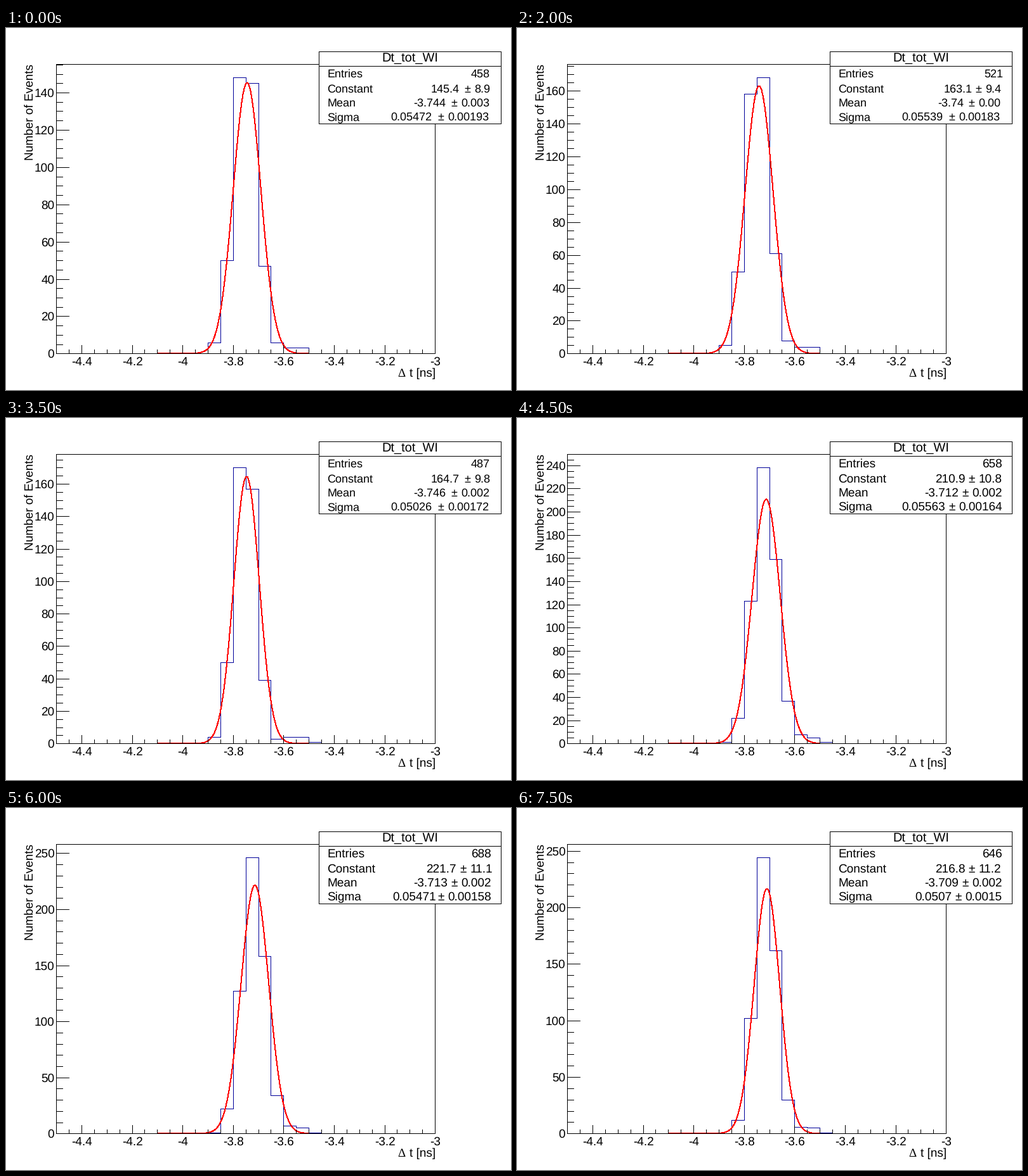
A matplotlib script for the animation above (8000 ms loop, 796x572 px).

```python
import math
import numpy as np
import matplotlib.pyplot as plt
from matplotlib.animation import FuncAnimation
from matplotlib.patches import Rectangle

W, H, DPI = 796, 572, 64
PT = 72 / DPI
FRAMES, INTERVAL = 16, 500
LEFT, RIGHT, TOP, BOTTOM = 79, 676, 57, 514
X_MIN, BIN, N_BINS = -4.5, 0.05, 30
FIT_RANGE = (-4.1, -3.5)
BLUE, RED = "#000099", "#ff0000"

plt.rcParams.update({"font.family": "Liberation Sans", "text.hinting": "none"})

# run: entries, tallest bin, fit constant, mean, sigma
KEYS = {
    0: (458, 148, 145.4, -3.744, .05472),
    2: (518, 185, 175.8, -3.742, .05185),
    4: (521, 168, 163.1, -3.740, .05539),
    7: (487, 170, 164.7, -3.746, .05026),
    9: (658, 238, 210.9, -3.712, .05563),
    12: (688, 246, 221.7, -3.713, .05471),
    15: (646, 244, 216.8, -3.709, .05070),
}

fig = plt.figure(figsize=(W / DPI, H / DPI), dpi=DPI, facecolor="white")
ax = fig.add_axes([0, 0, 1, 1])


def run_data(i):
    return [np.interp(i, list(KEYS), column) for column in zip(*KEYS.values())]


def bin_counts(peak, mean, sigma):
    """A core slightly sharper than the fit, with a small tail on the right."""
    x = X_MIN + BIN * (np.arange(N_BINS) + .5)
    core = np.exp(-.66 * ((x - mean + .007) / sigma) ** 2)
    tail = .025 * np.exp(-((x + 3.55) / .05) ** 2)
    shape = core + tail
    return np.round(peak * shape / shape.max())


def px(x):
    return 79.6 + 398 * (x - X_MIN)


def py(v, top):
    return 514.8 - 457.6 * v / top


def line(xs, ys, color="black", width=1, **kw):
    ax.plot(xs, ys, color=color, lw=width * PT, antialiased=False,
            solid_capstyle="butt", solid_joinstyle="miter", **kw)


def text(x, y, s, size=19, ha="left", **kw):
    ax.text(x, y, s, fontsize=size * PT, ha=ha, va="baseline", **kw)


def box(x0, y0, x1, y1, **kw):
    ax.add_patch(Rectangle((x0, y0), x1 - x0, y1 - y0, ec="black", lw=PT,
                           antialiased=False, **kw))


def advance(s, size=19):
    """Ink width of a number; a closing 1 leaves blank space on its right."""
    em = sum({".": .278, "-": .333}.get(c, .556) for c in s)
    return (em - .18 * s.endswith("1")) * size


def draw_histogram(counts, top):
    edges = np.floor(px(X_MIN + BIN * np.arange(N_BINS + 1)) + 1e-6)
    levels = np.floor(py(counts, top))
    ys = np.concatenate([[BOTTOM], np.repeat(levels, 2), [BOTTOM]])
    line(np.repeat(edges, 2), ys, BLUE)


def draw_fit(const, mean, sigma, top):
    x = np.linspace(*FIT_RANGE, 100)
    y = const * np.exp(-.5 * ((x - mean) / sigma) ** 2)
    line(px(x) - .75, py(y, top) - .75, RED)


def draw_axes(top):
    box(LEFT, TOP, RIGHT, BOTTOM, fill=False, zorder=3)
    for k in range(1, N_BINS + 1):
        value = X_MIN + BIN * k
        x = math.floor(px(value) + 1e-6)
        major = k % 4 == 2
        line([x, x], [BOTTOM, BOTTOM - (13 if major else 6)])
        if major:
            text(x, 533, f"{round(value, 1):g}", ha="center")
    major, minor = (20, 5) if top < 250 else (50, 10)
    for v in range(0, int(top) + 1, minor):
        y = math.floor(py(v, top))
        line([LEFT, LEFT + (20 if v % major == 0 else 10)], [y, y])
        if v % major == 0:
            text(76, y + 7, str(v), ha="right")
    text(42.5, 56.5, "Number of Events", ha="right", rotation=90, rotation_mode="anchor")
    text(617.5, 551, "Δ", family="Liberation Serif")
    text(676.5, 551, "t [ns]", ha="right")


def draw_stats(entries, const, mean, sigma, size):
    box(493, 37, 780, 151, fc="white", zorder=4)
    line([493, 780], [60, 60], zorder=5)
    text(637, 53, "Dt_tot_WI", 20, "center", zorder=5)
    edge = 764.5
    root = math.sqrt(entries)
    rows = (
        ("Constant", 102, const, 1.31 * const / root),
        ("Mean", 124, mean, sigma / root),
        ("Sigma", 146, sigma, 1.068 * sigma / (math.sqrt(2) * root)),
    )
    count = f"{entries:.0f}"
    text(506, 78, "Entries", size, zorder=5)
    text(edge - advance(count), 78, count, size, zorder=5)
    for name, y, value, error in rows:
        value = f"{value:.4g}"
        error = f"{error:.{len(value.partition('.')[2])}f}"
        x_err = edge - advance(error)
        x_pm = x_err - 16
        text(506, y, name, size, zorder=5)
        text(x_err, y, error, size, zorder=5)
        text(x_pm, y, "±", size, zorder=5)
        text(x_pm - 5.5 - advance(value), y, value, size, zorder=5)


def update(i):
    ax.clear()
    ax.set_axis_off()
    # a quarter pixel keeps whole coordinates clear of the rounding edge
    ax.set_xlim(-.25, W - .25)
    ax.set_ylim(H - .25, -.25)
    ax.autoscale(False)
    entries, peak, const, mean, sigma = run_data(i)
    top = 1.05 * round(peak)
    draw_histogram(bin_counts(round(peak), mean, sigma), top)
    draw_fit(const, mean, sigma, top)
    draw_axes(top)
    draw_stats(entries, const, mean, sigma, 18 if i < 9 else 19)
    return []


anim = FuncAnimation(fig, update, frames=FRAMES, interval=INTERVAL, repeat=True,
                     repeat_delay=0, blit=False)
plt.show()
```
